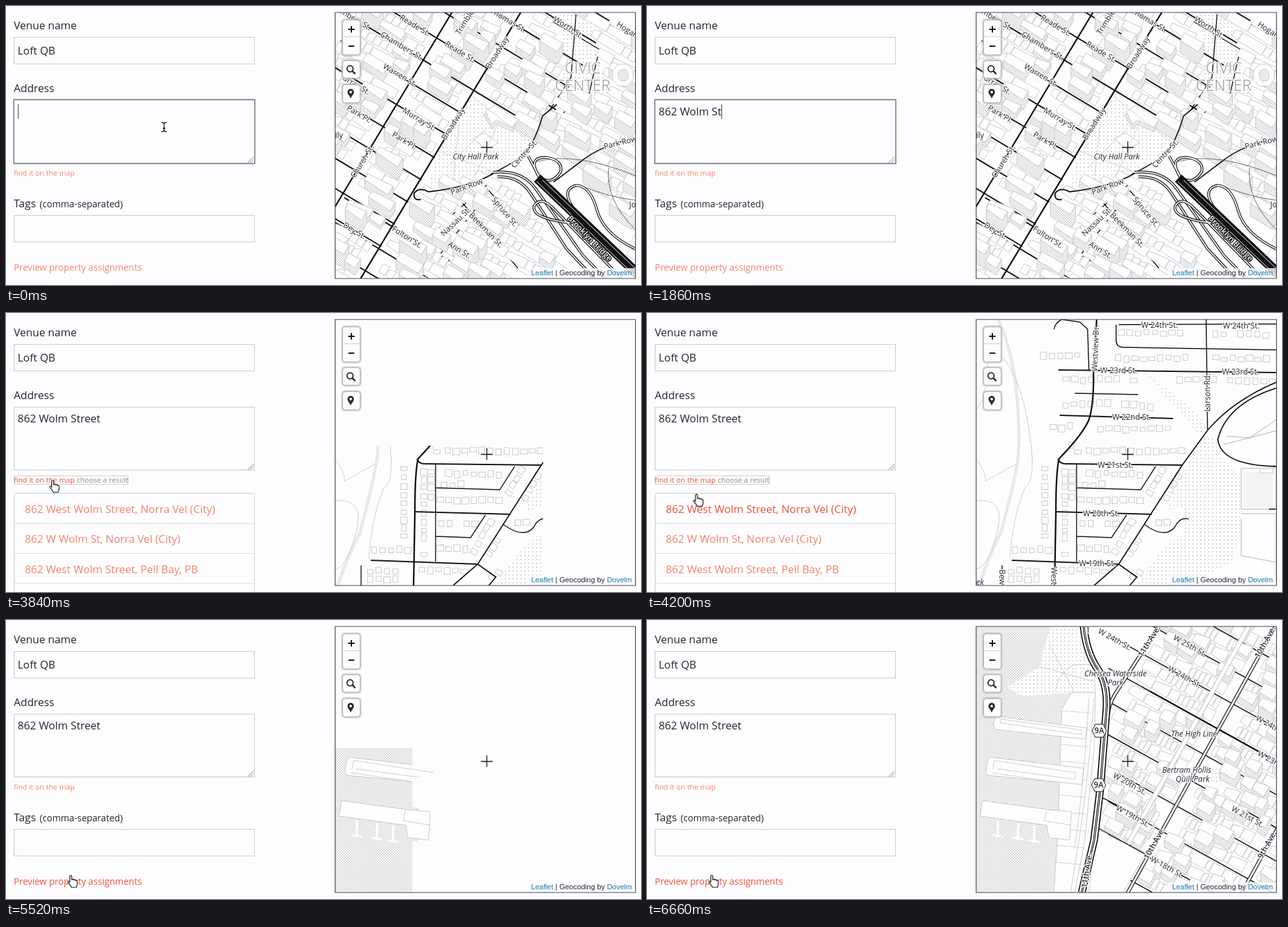
Animation of 980x431 px, one loop 6720 ms. Source, as an HTML page:

```html
<!DOCTYPE html>
<html lang="en">
<head>
<meta charset="utf-8">
<title>Venue form with map</title>
<style>
html, body { margin: 0; width: 100%; height: 100%; overflow: hidden; background: #fdfdff; }
svg { display: block; width: 980px; height: 431px; }
text { font: 16.6px "Open Sans", sans-serif; fill: #24242c; white-space: pre; }
.mid { font-size: 14.1px; }
.small { font-size: 11.3px; }
.link { fill: #f5836c; }
.hot { fill: #ee5238; }
.note { fill: #8c8c90; }
.box { fill: none; stroke: #c9c9c8; }
.label { font-size: 12px; text-anchor: middle; paint-order: stroke; stroke: #fdfdff; stroke-width: 2.6px; stroke-linejoin: round; }
.park { font-style: italic; }
.area { font-size: 24px; font-weight: 300; fill: #8e8e92; }
.bold { font-weight: 600; }
.bridge { fill: #fff; stroke: #121214; font-weight: 600; }
.credit { font: 11.4px "Liberation Sans", Arial, sans-serif; }
.blue { fill: #1478a8; }
</style>
</head>
<body>
<svg id="stage" viewBox="0 0 980 431"></svg>
<script>
const BG = '#fdfdff', INK = '#121214', PALE = '#c8c8ca';

const path = (d, w = 1, c = INK, more = '') =>
  `<path d="${d}" fill="none" stroke="${c}" stroke-width="${w}" ${more}/>`;
const fill = (d, f, stroke = 'none') => `<path d="${d}" fill="${f}" stroke="${stroke}"/>`;
const cased = (d, w, c = BG) => path(d, w) + path(d, w - 2.4, c);
const label = (x, y, s, turn = 0, kind = '') =>
  `<text class="label ${kind}" transform="translate(${x} ${y}) rotate(${turn})" dy="4">${s}</text>`;
const text = (x, y, s, kind = '', more = '') =>
  `<text x="${x}" y="${y}" class="${kind}" ${more}>${s}</text>`;
const box = (x, y, w, h, more = '') =>
  `<rect x="${x}" y="${y}" width="${w}" height="${h}" ${more}/>`;
const random = seed => () => (seed = seed * 16807 % 2147483647) / 2147483647;

function grid(degrees) {
  const c = Math.cos(degrees * Math.PI / 180), s = Math.sin(degrees * Math.PI / 180);
  const at = (u, v) => [u * c - v * s, u * s + v * c];
  const line = (u0, v0, u1, v1) => `M${at(u0, v0)}L${at(u1, v1)}`;
  return { at, line };
}

function inside(x, y, poly) {
  let hit = false;
  poly.forEach(([ax, ay], i) => {
    const [bx, by] = poly[(i + poly.length - 1) % poly.length];
    if ((ay > y) !== (by > y) && x < (bx - ax) * (y - ay) / (by - ay) + ax) hit = !hit;
  });
  return hit;
}

// Rows of buildings along the streets, hatched on their visible walls
function buildings({ at, seed, start, step, from, to, avenues, size, height, skip }) {
  const r = random(seed), list = [];
  for (let v = start; v < 330; v += step) for (const row of [0, 1]) {
    const v0 = v + 3 + row * (step / 2 - 2), v1 = v0 + step / 2 - 4;
    for (let u = from, w; u < to; u += w + 1) {
      w = size * (r() < 0.45 ? 0.4 : 0.7 + r() * 0.9);
      const tall = w > size * 0.6 && r() < 0.55 ? 5 + r() * height : r() * 2, cut = r() * 5;
      const [x, y] = at(u + w / 2, (v0 + v1) / 2);
      if (x < 495 || x > 985 || y < 0 || y > 440 || skip(x, y)) continue;
      if (avenues.some(a => u < a + 6 && u + w > a - 6)) continue;
      const up = ([px, py]) => [px, py - tall];
      const a = at(u, v0 + cut), b = at(u + w, v0), c = at(u + w, v1), d = at(u, v1 - cut / 2);
      const wall = tall > 2 ? fill(`M${d}L${c}L${b}L${up(b)}L${up(c)}L${up(d)}Z`, 'url(#hatch)', PALE) : '';
      list.push([y, wall + fill(`M${[a, b, c, d].map(up).join('L')}Z`, BG, PALE)]);
    }
  }
  return list.sort((p, q) => p[0] - q[0]).map(p => p[1]).join('');
}

function downtown() {
  const { at, line } = grid(31);
  const parkShape = [[718, 138], [800, 186], [818, 218], [775, 250], [650, 282], [668, 224]];
  const bridgeShape = [[750, 252], [812, 222], [870, 230], [905, 270], [971, 360], [971, 421], [880, 421], [800, 310]];
  const civic = [[850, 10], [905, 10], [915, 80], [930, 140], [850, 150], [862, 80]];
  const open = [parkShape, bridgeShape, civic];
  let s = fill(`M${parkShape.join('L')}Z`, 'url(#dots)') + fill(`M${civic.join('L')}Z`, 'url(#dots)');
  for (let v = -460; v < 60; v += 40) s += path(line(470, v, v < -250 ? 810 : 688, v), 2);
  for (const v of [-15, 25, 65]) s += path(line(600, v, 790, v), 2);
  s += path('M665 390L735 300M790 405L705 305M820 370L745 285M750 270L680 330', 1.5);
  s += path('M820 10L971 100M900 10L971 52M880 10L872 110L830 175M915 70L900 135L860 165M925 150L971 180', 1.4);
  s += buildings({ at, seed: 77, start: -460, step: 40, from: 470, to: 1060, avenues: [595, 686], size: 27, height: 18,
    skip: (x, y) => open.some(p => inside(x, y, p)) });
  s += fill('M737 168L752 158L788 180L782 194L756 183L750 190Z', 'url(#hatch)', PALE)
    + fill('M740 163L754 153L790 175L782 188L757 176L749 183Z', BG, PALE)
    + fill('M720 205L738 196L760 211L743 222Z', BG, PALE);
  s += path('M670 225L750 255M700 170L690 270M720 140L815 215M760 180L725 260M680 250L740 190', 0.8, PALE);
  s += fill('M936 100l9-10h14l9 10v14l-9 10h-14l-9-10z', BG, PALE) + fill('M945 103l4-5h7l4 5v8l-4 5h-7l-4-5z', 'url(#hatch)', PALE);
  s += path(line(595, -460, 595, 20), 2.3) + path(line(686, -460, 686, 120), 2.4);
  s += path('M640 299Q628 301 630 289Q638 279 652 287Q715 280 752 259', 2);
  s += path('M971 204Q920 215 890 238T845 272M748 260Q785 242 800 228T828 170L850 152', 1.7);
  s += path('M888 278Q930 295 971 300M930 250Q925 300 971 345M820 240Q880 225 971 262', 0.9, '#55555a');
  for (const d of [
    'M752 257Q796 252 818 283T890 385L925 421',
    'M758 264Q792 262 810 290T865 375L908 421',
    'M825 268Q802 232 835 234Q860 239 856 256Q842 278 823 264L806 232',
    'M872 335Q810 328 815 309Q825 292 846 314L950 421',
    'M888 328Q850 285 880 277Q902 278 912 315T971 375'
  ]) s += cased(d, 4.2);
  s += path('M820 266L975 414', 15) + path('M828 269L978 412', 1, BG) + path('M819 271L970 416', 1, BG);
  const names = [
    ['mbers St.', 540, 21, 31], ['Reade St.', 631, 30, 31], ['Reade St.', 701, 71, 31], ['Trimble', 708, 25, -58],
    ['Chambers St.', 611, 62, 31], ['Thomas St.', 775, 22, 31], ['Worth St.', 868, 33, 33], ['Hogan', 959, 37, 33],
    ['Warren St.', 608, 107, 31], ['urray St.', 541, 122, 31], ['Murray St.', 638, 175, 31], ['Park Pl.', 545, 167, 31],
    ['Park Pl.', 615, 208, 31], ['Broadway', 758, 72, -58], ['Broadway', 690, 182, -58], ['Church St.', 550, 240, -58],
    ['Centre St.', 800, 228, -48], ['Park Row', 711, 279, -20], ['Park Row', 948, 211, -14], ['Dey St.', 538, 347, 31],
    ['Fulton St.', 619, 357, 33], ['Nassau St.', 694, 333, -44], ['Beekman St.', 741, 346, 46], ['Spruce St.', 770, 318, 50],
    ['Ann St.', 700, 377, 31], ['ily', 514, 200, 0], ['Jo', 967, 307, 0]
  ].map(([n, x, y, a]) => label(x, y, n, a)).join('');
  return [s, names + label(725, 232.5, 'City Hall Park', 0, 'park')
    + label(890, 100, 'CIVIC', 0, 'area') + label(890, 127, 'CENTER', 0, 'area')
    + label(901, 359, 'Brooklyn Bridge', 46, 'bridge')];
}

function suburb() {
  const r = random(51);
  const houses = (x0, y0, x1, y1) => {
    const n = Math.hypot(x1 - x0, y1 - y0) / 13, turn = Math.abs(x1 - x0) > 4 && Math.abs(y1 - y0) > 15 ? 30 : 0;
    let s = '';
    for (let i = 0; i <= n; i++) {
      const x = x0 + (x1 - x0) * i / n, y = y0 + (y1 - y0) * i / n + r() * 4 - 2;
      const w = 7 + r() * 4, h = 6 + r() * 5;
      if (r() > 0.05) s += box(x - w / 2, y - h / 2, w, h, `transform="rotate(${turn + r() * 6 - 3} ${x} ${y})" fill="none" stroke="${PALE}"`);
    }
    return s;
  };
  let s = fill('M852 192L880 195L893 232L915 252V340L902 385L830 421H755L790 372L830 335L828 300L800 305L830 240Z', 'url(#dots)');
  s += fill('M768 90Q800 118 840 145L866 180L850 190Q835 160 800 130Z', 'url(#dots)');
  s += path('M542 10Q565 60 571 130T571 235T546 340Q530 370 512 421', 5, 'url(#hatch)');
  s += path('M520 45Q570 70 587 165T583 270Q563 320 560 380M508 225Q525 250 522 260L570 233M508 290Q555 285 540 340T508 395M508 150Q530 120 525 55', 0.9, PALE);
  s += [
    [732, 32, 830, 30], [877, 32, 964, 34], [612, 68, 670, 66], [727, 70, 836, 70], [878, 70, 965, 70], [647, 103, 762, 103],
    [822, 104, 966, 104], [646, 142, 716, 140], [738, 142, 785, 144], [627, 178, 664, 174], [700, 178, 816, 180],
    [655, 205, 670, 218], [682, 212, 830, 214], [670, 247, 768, 250], [676, 265, 712, 264], [670, 289, 765, 289],
    [672, 325, 724, 326], [670, 363, 714, 365], [568, 367, 622, 365], [642, 396, 716, 398], [562, 398, 610, 397],
    [562, 412, 610, 413], [614, 242, 614, 348], [645, 244, 645, 374], [656, 244, 656, 292], [795, 244, 770, 288],
    [748, 322, 722, 368], [820, 252, 800, 290], [790, 323, 806, 325], [758, 350, 742, 378], [772, 395, 740, 414]
  ].map(a => houses(...a)).join('');
  s += path('M890 203L971 182M895 190L930 193L971 165M917 240H971V303H917ZM917 310H971V421M917 318V375L971 385', 0.9, '#a6a6a8');
  s += box(920, 245, 46, 54, `fill="url(#hatch)" opacity=".5"`) + box(946, 240, 20, 7, `fill="${BG}" stroke="${PALE}"`);
  s += path('M640 10Q630 15 628 25M640 10L668 14L680 25L682 88M728 18L971 17M724 18V42Q724 53 735 53L971 57M863 10L865 180M660 124L758 126', 1.5);
  s += path('M663 232V384M663 270L762 273L785 237M663 345L717 347L740 312M768 327Q800 350 815 330Q822 315 836 318M548 390V421M960 303H971', 1.4);
  s += path('M971 107Q905 135 866 180L826 235L728 388L690 421M728 388L756 408L745 421M971 116Q895 140 881 195Q885 235 971 237', 1.8);
  s += path('M635 88L971 92M637 158L812 163M634 226Q638 234 650 233L827 235M631 307L779 311M563 382L728 388', 2);
  s += path('M694 10L689 92Q690 140 682 165Q672 188 636 225Q631 245 631 310L629 421', 2.4);
  const names = [
    ['W 24th St.', 791, 19], ['W 24th St.', 917, 20], ['W 23rd St.', 728, 89], ['W 23rd St.', 916, 91],
    ['W 22nd St.', 748, 161], ['W 21st St.', 723, 235], ['W 20th St.', 701, 310], ['W 19th St.', 695, 387],
    ['Westview Dr.', 692, 54, -88], ['Larson Rd.', 865, 123, -90], ['West', 628, 406, 90], ['Bew', 548, 408, 90]
  ].map(([n, x, y, a]) => label(x, y, n, a)).join('');
  return [s, names + label(514, 416, 'ek', 0, 'park')];
}

function riverside() {
  const { at, line } = grid(29);
  const shore = y => y < 118 ? 782 - (y - 10) * 0.58 : 722 - (y - 118) * 0.1;
  let s = fill('M508 10H622L606 72L556 104L580 118L655 112L646 138L640 330L630 421H508Z', 'url(#hatch)');
  s += fill('M622 10H668L690 70L688 112L655 113L580 118L558 104L606 72Z', 'url(#dots)');
  s += path('M606 72L690 95M622 40L660 112M630 110Q640 60 685 70M668 10L690 70L692 120', 0.9, PALE);
  s += fill('M655 112L692 112L690 200L675 345L660 421H628L634 330L640 138Z', BG, PALE);
  for (let y = 140; y < 400; y += 26) s += path(`M${648 - y / 20} ${y}l44 4`, 0.8, PALE);
  s += path('M690 120Q680 260 665 350T655 421M682 120Q674 260 660 350', 0.9, PALE);
  const pier = (x, y, len, h, rise) => fill(`M${x + 5} ${y}L${x + len} ${y + rise}L${x + len - 3} ${y + rise + h}L${x} ${y + h + 3}L${x - 3} ${y + h - 3}Q${x - 1} ${y} ${x + 5} ${y}Z`, BG, PALE);
  s += pier(537, 149, 142, 17, 18) + path('M545 159L670 177L671 170L546 153Z', 0.9, PALE);
  s += pier(526, 212, 148, 25, 17) + path('M540 230L660 246L662 236L536 217L534 230M532 236L634 251', 0.9, PALE);
  s += fill('M518 279L620 293L655 296L652 340L620 336L617 317L514 303Z', BG, PALE) + path('M617 293L613 310L655 317', 0.9, PALE);
  for (const [x, y] of [[542, 310], [573, 314], [598, 318]]) s += path(`M${x} ${y}l-1 24m-8 -2l17 3`, 3.5, BG);
  for (let v = -415; v < 80; v += 45) s += path(line((712 + 0.485 * v) / 0.875, v, 1080, v), 1.6);
  s += buildings({ at, seed: 913, start: -460, step: 45, from: 600, to: 1080, avenues: [694, 853, 1007], size: 18, height: 10,
    skip: (x, y) => x < shore(y) + 6 || inside(x, y, [[850, 220], [900, 225], [895, 262], [850, 258]]) });
  s += box(866, 228, 24, 26, 'fill="url(#dots)"');
  s += cased(line(817, -460, 817, 60), 8).replaceAll(INK, PALE);
  s += fill('M693 322L768 362L735 421H682Z', BG, PALE);
  s += path('M697 277L700 274Q710 276 780 318M690 318L770 362', 1.4);
  s += path(line(732, -280, 1080, -280), 2.3);
  for (const u of [853, 1007]) s += cased(line(u, -470, u, 120), 5.5);
  s += cased('M790 10L722 115Q712 132 711 150', 5.5);
  const highway = 'M674 10Q678 50 695 75Q712 100 709 140L699 265L690 340L671 421';
  s += path(highway, 12) + path(highway, 8.5, BG) + path(highway, 3.2) + path(highway, 1, BG);
  const names = [
    ['W 24th St.', 722, 30, 29], ['W 25th St.', 838, 40, 29], ['W 24th St.', 830, 88, 29], ['W 24th', 958, 160, 29],
    ['W 23rd', 961, 215, 29], ['W 20th St.', 745, 253, 29], ['W 19th St.', 750, 303, 29], ['W 21st St.', 927, 304, 29],
    ['W 18th St.', 803, 382, 29], ['11th Ave.', 775, 33, -58], ['11th Ave.', 679, 387, -80], ['10th Ave.', 954, 34, -61],
    ['10th Ave.', 783, 345, -61], ['9th Ave.', 957, 347, -61], ['1', 681, 16, 0]
  ].map(([n, x, y, a]) => label(x, y, n, a, n.includes('Ave') ? 'bold' : '')).join('');
  const parks = [
    ['Chelsea Waterside', 723, 83], ['Park', 723, 97], ['The High Line', 844, 175.5],
    ['Bertram Hollis', 833, 232], ['Quill Park', 842, 246]
  ].map(([n, x, y]) => label(x, y, n, 0, 'park')).join('');
  const shield = (x, y) => fill(`M${x - 11} ${y}l5-10h12l5 10l-5 10h-12z`, BG, INK) + label(x, y, '9A', 0, 'bold');
  return [s, names + parks + shield(698, 171) + shield(697, 255)];
}

const maps = [downtown, suburb, riverside].map((draw, i) => {
  const [shapes, names] = draw();
  return `<g id="map${i}"><g id="tiles${i}">${shapes}</g><g id="names${i}">${names}</g></g>`;
}).join('');

const button = (y, h) => box(517, y - 2, 32, h + 4, 'rx="6" fill="#c4c4c8" opacity=".6"')
  + box(519.5, y + .5, 27, h - 1, `rx="4" fill="${BG}" stroke="#a9a9ac"`);

const rows = ['862 West Wolm Street, Norra Vel (City)', '862 W Wolm St, Norra Vel (City)', '862 West Wolm Street, Pell Bay, PB'];
const typed = '862 Wolm Street';

stage.innerHTML = `<defs>
<pattern id="hatch" width="4" height="4" patternUnits="userSpaceOnUse"><rect width="4" height="4" fill="${BG}"/>
<path d="M0 .5h3M0 2.5h1M2 2.5h2" stroke="${PALE}"/></pattern>
<pattern id="dots" width="6" height="6" patternUnits="userSpaceOnUse"><rect x="2" y="2" width="1.5" height="1.5" fill="#b8b8ba"/></pattern>
<clipPath id="frame"><path d="M508 10H971V421H508Z"/></clipPath>
<clipPath id="suburbTile"><path d="M508 205H829V421H508Z"/></clipPath>
<clipPath id="suburbMore"><path d="M508 10H829V421H508Z"/></clipPath>
<clipPath id="riverTile"><path d="M508 197H627V225L660 232V243H627V290H655V342H627V421H508Z"/></clipPath>
<clipPath id="riverMore"><path d="M508 197H883V421H508Z"/></clipPath>
</defs>`
  + text(12, 36, 'Venue name') + box(12.5, 48.5, 371, 41, 'class="box"') + text(18, 75, 'Loft QB')
  + text(12, 133, 'Address') + box(12.5, 145.5, 371, 97, 'class="box"')
  + box(12, 144.5, 372, 99, 'id="focus" fill="none" stroke="#77778c" stroke-width="1.5"')
  + path('M373 242l9-9M377 242l5-5', 1, '#85858c')
  + text(18, 169, '', '', 'id="address"') + box(0, 152, 1, 22, 'id="caret" fill="#24242c"')
  + text(12, 262, 'find it on the map', 'small link', 'id="find"') + text(109, 262, '', 'small note', 'id="note"')
  + box(12.5, 251.5, 142, 13, 'id="ring" fill="none" stroke="#a09a9a" stroke-dasharray="1 1"')
  + `<g id="tags">${text(12, 311, 'Tags')}${text(52, 311, '(comma-separated)', 'mid')}`
  + box(12.5, 323.5, 371, 41, 'class="box"') + text(12, 409, 'Preview property assignments', 'mid link', 'id="preview"') + '</g>'
  + `<g id="results">${box(12.5, 278.5, 371, 180, 'class="box" rx="3"')}${path('M12 325.5H383M12 371.5H383M12 417.5H383', 1, '#dcdcdc')}`
  + rows.map((s, i) => text(29, 309 + i * 46.3, s, 'link', `id="row${i}"`)).join('') + '</g>'
  + `<g clip-path="url(#frame)">${maps}${box(804, 405, 168, 17, `fill="${BG}" opacity=".8"`)}`
  + `<text x="966" y="416" class="credit" text-anchor="end"><tspan class="blue">Leaflet</tspan> | Geocoding by <tspan class="blue">Dovelm</tspan></text></g>`
  + path('M733 218.5H751M742 209V227', 1.3) + button(21, 55) + button(84, 28) + button(121, 29)
  + path('M520 47.5H546', 1, '#d0d0d2') + path('M528 36H538M533 31V41M528.5 62H537.5', 2)
  + '<circle cx="531" cy="97" r="4.7" fill="none" stroke="#2c2c30" stroke-width="2"/>' + path('M534.5 100.5L539 105', 2.5, '#2c2c30')
  + '<path d="M532 143C530 138 527 136 527 133A5 5 0 0 1 537 133C537 136 534 138 532 143ZM532 131a2 2 0 1 0 .01 0Z" fill="#2c2c30" fill-rule="evenodd"/>'
  + path('M508 10H971.5V421H508Z', 1.2, '#45454e')
  + `<g id="beam">${path('M-4 -7Q0 -7 0 -5Q0 -7 4 -7M0 -5V5M-4 7Q0 7 0 5Q0 7 4 7M-2 2H2', 1.3)}</g>`
  + '<path id="hand" d="M-1.5 1c0-2 3-2 3 0v5c1-1 3-1 3 .5c1-1 3-.5 3 1c1-.5 2.5 0 2.5 1.5v4c0 2-1 3-1.5 5H1c-1-3-3.5-5-5.5-8c0-2 1.5-2 3 0Z" fill="#fff" stroke="#121214" stroke-width="1.2"/>';

const el = id => document.getElementById(id);
const show = (id, on) => el(id).style.display = on ? '' : 'none';
const ease = (t, a, b) => { const p = Math.min(1, Math.max(0, (t - a) / (b - a))); return p * p * (3 - 2 * p); };
const CLICK = 2940, FOUND = 3660, PICK = 5340;

function showMap(i, t, start, clips) {
  // blank, then two partial loads, then the whole map with its labels
  const stageNo = t < start + 120 ? -1 : t < start + 300 ? 0 : t < start + 480 ? 1 : 2;
  show('map' + i, stageNo >= 0);
  show('names' + i, stageNo === 2);
  el('tiles' + i).setAttribute('clip-path', stageNo < 2 ? `url(#${clips[Math.max(0, stageNo)]})` : 'none');
}

function draw() {
  const t = performance.now() % 6720;
  const count = Math.max(0, Math.min(typed.length, Math.floor((t - 300) / 138)));
  const editing = t < CLICK, choosing = t >= FOUND && t < PICK, linked = t >= CLICK && t < PICK;
  const address = el('address');
  if (address.textContent.length !== count) address.textContent = typed.slice(0, count);
  el('caret').setAttribute('x', 18 + (count ? address.getComputedTextLength() : 0.5));
  show('caret', editing && (t < 2450 || t % 1000 < 500));
  show('focus', editing);

  const a = ease(t, 2460, 2820), b = ease(t, 4080, 4560);
  const x = 244 - 172 * a + 28 * b, y = 187 + 72 * a + 136 * b;
  const hand = y > 250;
  show('beam', !hand && (t < 400 || t > 2440));
  show('hand', hand);
  el('beam').setAttribute('transform', `translate(${x} ${y})`);
  el('hand').setAttribute('transform', `translate(${x} ${y})`);

  el('find').classList.toggle('hot', linked || (hand && y < 266));
  el('note').textContent = !linked ? '' : choosing ? 'choose a result' : '(loading)';
  el('ring').setAttribute('width', choosing ? 176 : 142);
  show('ring', linked);
  show('results', choosing);
  show('tags', !choosing);
  rows.forEach((_, i) => el('row' + i).classList.toggle('hot', y > 278 + i * 46.3 && y < 325 + i * 46.3));
  el('preview').classList.toggle('hot', t >= PICK);

  show('map0', t < FOUND);
  if (choosing) showMap(1, t, FOUND, ['suburbTile', 'suburbMore']); else show('map1', false);
  if (t >= PICK) showMap(2, t, PICK, ['riverTile', 'riverMore']); else show('map2', false);
  requestAnimationFrame(draw);
}
draw();
</script>
</body>
</html>
```
